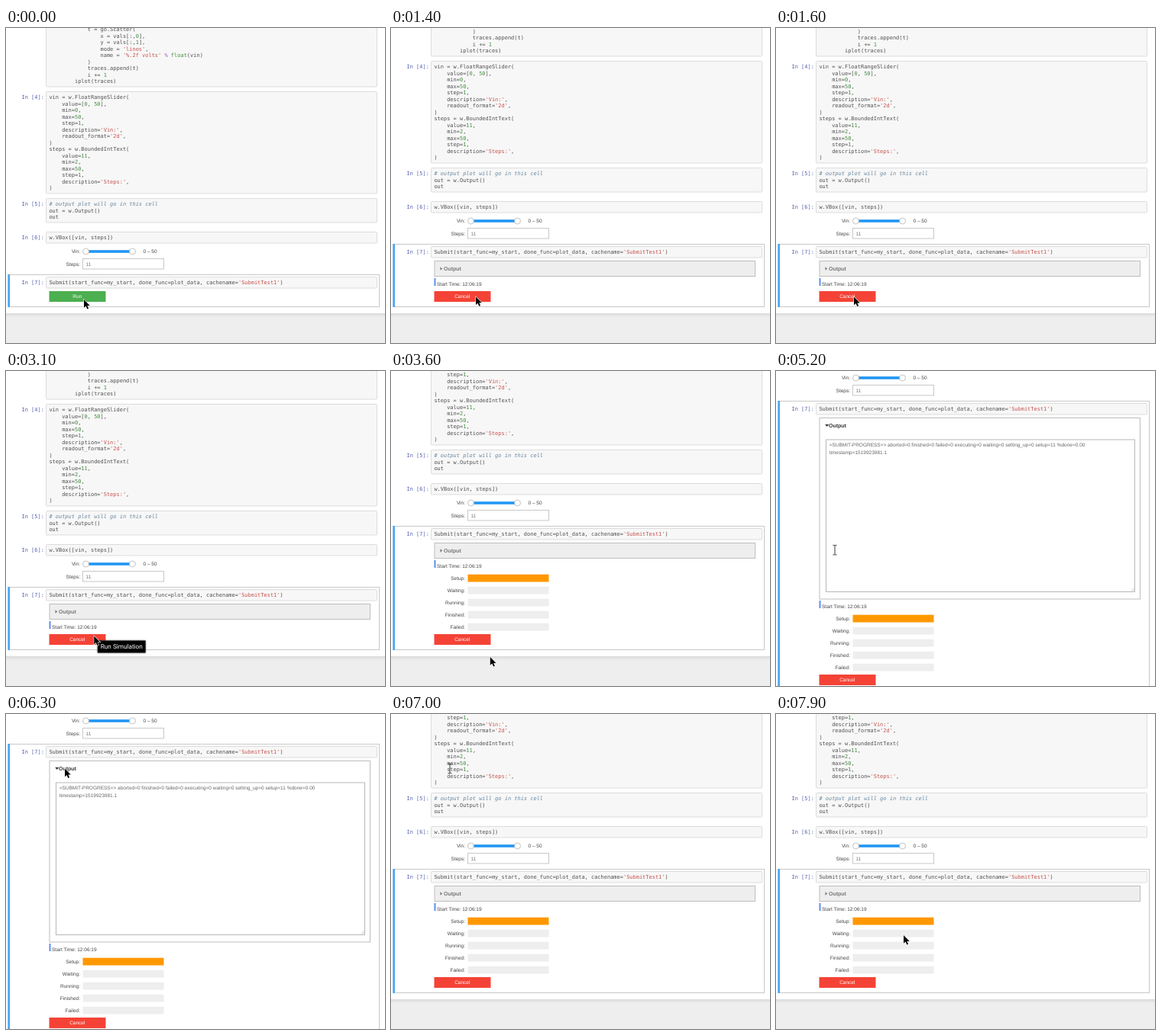
An HTML page that plays this animation: 496 by 413 pixels, repeating every 8000 ms.

```html
<!DOCTYPE html>
<html lang="en">
<head>
<meta charset="utf-8">
<title>Notebook run</title>
<style>
  html, body { margin: 0; width: 100%; height: 100%; overflow: hidden; background: #fff; }
  svg { display: block; width: 496px; height: 413px; }
  text { font: 6.5px "Liberation Sans", Arial, sans-serif; fill: #444; white-space: pre; text-rendering: geometricPrecision; }
  .code { font: 6.97px "DejaVu Sans Mono", monospace; fill: #505050; }
  .prompt { fill: #5560ac; }
  .comment { fill: #6888a0; font-style: italic; }
  .string { fill: #c4524e; }
  .number { fill: #3f8f3f; }
  .builtin { fill: #3f8f3f; }
  .operator { fill: #a050d8; }
  .button { fill: #fff; text-anchor: middle; }
  .label { text-anchor: end; }
  .value { fill: #777; }
  .summary { font-size: 7px; font-weight: bold; }
  .log { fill: #666; }
  .tip { font: 8.2px Roboto, "Noto Sans", sans-serif; fill: #fff; }
  .arrow { fill: #000; stroke: #fff; stroke-width: 1.1px; paint-order: stroke; }
  .popup { filter: drop-shadow(.6px .8px 1px rgba(0, 0, 0, .5)); }
</style>
</head>
<body>
<svg id="stage" viewBox="0 0 496 413">
  <defs>
    <linearGradient id="shade" x1="0" y1="0" x2="0" y2="1">
      <stop offset="0" stop-color="#dadada"/>
      <stop offset="1" stop-color="#eee"/>
    </linearGradient>
  </defs>
</svg>
<script>
const LOOP = 8000;
const STEP = 100;
const LINE = 8.5;
const stage = document.getElementById('stage');

function add(parent, tag, attrs = {}, content) {
  const el = document.createElementNS('http://www.w3.org/2000/svg', tag);
  set(el, attrs);
  if (content !== undefined) el.textContent = content;
  parent.appendChild(el);
  return el;
}
function set(el, attrs) {
  for (const key in attrs) el.setAttribute(key, attrs[key]);
}
const group = parent => add(parent, 'g');
const rect = (parent, x, y, width, height, fill, stroke = 'none') =>
  add(parent, 'rect', { x, y, width, height, fill, stroke });
const label = (parent, x, y, content, cls = '') =>
  add(parent, 'text', { x, y, class: cls }, content);
const move = (el, x, y) => el.setAttribute('transform', `translate(${x} ${y})`);
const show = (el, on) => { el.style.display = on ? '' : 'none'; };
const inside = (v, low, high) => v >= low && v <= high;

// Code cells: prompt number, top, text
const cells = [
  ['', -5.5,
`            t = go.Scatter(
                x = vals[:,0],
                y = vals[:,1],
                mode = 'lines',
                name = '%.2f volts' % float(vin)
            )
            traces.append(t)
            i += 1
        iplot(traces)`],
  ['4', 83.5,
`vin = w.FloatRangeSlider(
    value=[0, 50],
    min=0,
    max=50,
    step=1,
    description='Vin:',
    readout_format='2d',
)
steps = w.BoundedIntText(
    value=11,
    min=2,
    max=50,
    step=1,
    description='Steps:',
)`],
  ['5', 223.5,
`# output plot will go in this cell
out = w.Output()
out`],
  ['6', 267.5, 'w.VBox([vin, steps])'],
  ['7', 326.5, "Submit(start_func=my_start, done_func=plot_data, cachename='SubmitTest1')"]
].map(([num, top, code]) => {
  const lines = code.split('\n');
  return { num, top, lines, height: lines.length * LINE + 6 };
});
const TOKEN = /(#.*)|('[^']*')|(\b\d+\b)|(\bfloat\b)|(%)/g;
const KINDS = ['comment', 'string', 'number', 'builtin', 'operator'];

function codeLine(parent, x, y, line) {
  const text = label(parent, x, y, '', 'code');
  let end = 0;
  for (const m of line.matchAll(TOKEN)) {
    add(text, 'tspan', {}, line.slice(end, m.index));
    add(text, 'tspan', { class: KINDS[m.slice(1).findIndex(Boolean)] }, m[0]);
    end = m.index + m[0].length;
  }
  add(text, 'tspan', {}, line.slice(end));
}

// Page end and frame of the active cell
const foot = group(stage);
rect(foot, 0, 374, 496, 100, '#eee');
rect(foot, 0, 374, 496, 5, 'url(#shade)');
const frame = rect(stage, 3, 323.5, 485.5, 42, '#fff', '#c8c8c8');
const bar = rect(stage, 2.5, 323, 2.5, 43, '#42a5f5');

// Everything that scrolls with the code
const page = group(stage);
for (const { num, top, lines, height } of cells) {
  const base = top + 9.9;
  set(rect(page, 52.5, top, 433, height, '#f7f7f7', '#dcdcdc'), { rx: 1 });
  if (num) label(page, 20.5, base, `In [${num}]:`, 'code prompt');
  lines.forEach((line, i) => codeLine(page, 56.4, base + i * LINE, line));
}
label(page, 97, 295.4, 'Vin:', 'label');
rect(page, 104.5, 291.2, 61, 3.6, '#2196f3');
for (const cx of [104.5, 165.5])
  add(page, 'circle', { cx, cy: 293, r: 4, fill: '#fff', stroke: '#aaa', 'stroke-width': .7 });
label(page, 179.5, 295.4, '0 – 50');
label(page, 97, 311.5, 'Steps:', 'label');
rect(page, 100.5, 302.5, 106, 13.5, '#fff', '#c8c8c8');
label(page, 104.5, 311.7, '11', 'value');

// Collapsible output panel
const panel = group(page);
const panelBox = rect(panel, 57, 345.5, 419.5, 20, '#eee', '#bdbdbd');
const mark = add(panel, 'path');
const summary = label(panel, 69, 358, 'Output', 'summary');
const log = group(panel);
rect(log, 65.5, 374, 404, 199.5, '#fff', '#b8b8b8');
label(log, 69.7, 383.2, '=SUBMIT-PROGRESS=> aborted=0 finished=0 failed=0 executing=0 waiting=0 setting_up=0 setup=11 %done=0.00', 'log');
label(log, 69.7, 393.2, 'timestamp=1519923981.1', 'log');
add(log, 'path', { d: 'M465 572.5l4 -4M467.5 572.5l1.5 -1.5', stroke: '#999', 'stroke-width': .6 });

// Start time, progress bars, button
const start = group(stage);
rect(start, 56.5, 248, 2, 10, '#5a8ff0');
label(start, 60, 257.9, 'Start Time: 12:06:19');
const bars = group(stage);
['Setup', 'Waiting', 'Running', 'Finished', 'Failed'].forEach((name, i) => {
  const y = 271.6 + i * 16;
  label(bars, 97, y + 2.3, name + ':', 'label');
  rect(bars, 100.5, y - 4.9, 106, 9.8, i ? '#eee' : '#ff9800');
});
const button = group(stage);
const buttonBox = rect(button, 56.5, 345, 74, 14, '#4caf50');
const buttonText = label(button, 93.3, 354.3, 'Run', 'button');

// Tooltip and pointers
const tip = group(stage);
set(rect(tip, 0, 0, 62.5, 15.5, '#000', '#333'), { 'stroke-width': .6, class: 'popup' });
label(tip, 3.8, 10.6, 'Run Simulation', 'tip');
const arrow = add(stage, 'path', {
  d: 'M0 0V10.8L2.5 8.5L4.3 12.6L6.1 11.8L4.4 7.9H7.8Z', class: 'arrow'
});
const beam = add(stage, 'path', {
  d: 'M-2.5 -6.3H-.8L0 -5.6L.8 -6.3H2.5M0 -5.6V5.6M-2.5 6.3H-.8L0 5.6L.8 6.3H2.5',
  fill: 'none', stroke: '#222', 'stroke-width': .9
});

// Layouts: scroll of the code, offset of the status rows, offset of the page end
const EMPTY = { scroll: 0, status: 0, end: 0 };
const STARTED = { scroll: -40, status: 80, end: 0, panel: true };
const SETUP = { scroll: -120, status: 0, end: 0, panel: true, bars: true };
const OPEN = { scroll: -284, status: 53, end: 53, panel: true, bars: true, open: true };
const layouts = [[0, EMPTY], [1400, STARTED], [3200, SETUP], [5200, OPEN], [6900, SETUP]];
const layoutAt = t => layouts.findLast(([from]) => from <= t)[1];

const tips = [
  { from: 700, to: 1300, x: 108, y: 361.5 },
  { from: 2800, to: 3200, x: 120, y: 353.7 }
];

// Pointer moves: start time, number of steps, goal, optional bend
const moves = [
  { from: 200, steps: 1, goal: [120, 352] },
  { from: 1300, steps: 4, goal: [102, 352.5] },
  { from: 2000, steps: 4, goal: [115.3, 347.5], bend: [108, 333] },
  { from: 3200, steps: 5, goal: [129.8, 375] },
  { from: 3800, steps: 2, goal: [128, 363.5] },
  { from: 4100, steps: 7, goal: [77, 234.7] },
  { from: 5600, steps: 5, goal: [77, 71.5], bend: [108, 150] },
  { from: 7300, steps: 7, goal: [167, 290], bend: [90, 180] }
];

function pointerAt(t) {
  let pos = [102, 356];
  for (const { from, steps, goal, bend } of moves) {
    if (t < from) break;
    const u = Math.min(1, (Math.floor((t - from) / STEP) + 1) / steps);
    pos = pos.map((a, i) => {
      const mid = bend ? bend[i] : (a + goal[i]) / 2;
      return (1 - u) ** 2 * a + 2 * u * (1 - u) * mid + u * u * goal[i];
    });
  }
  return pos;
}

function draw(t) {
  const view = layoutAt(t);
  const [x, y] = pointerAt(t);
  const docY = y - view.scroll;
  const hover = view.open || inside(docY, 345.5, 365.5) && inside(x, 57, 476);
  const typing = inside(x, 52, 485) && (
    cells.some(({ top, height }) => inside(docY, top, top + height)) ||
    view.open && inside(docY, 374, 573));

  move(page, 0, view.scroll);
  move(foot, 0, view.end);
  move(button, 0, view.end);
  move(start, 0, view.status);
  move(bars, 0, view.status);
  set(frame, { y: 323.5 + view.scroll, height: 42 + view.end - view.scroll });
  set(bar, { y: 323 + view.scroll, height: 43 + view.end - view.scroll });

  show(panel, view.panel);
  show(start, view.panel);
  show(bars, view.bars);
  show(log, view.open);
  const ink = hover ? '#333' : '#777';
  set(panelBox, { height: view.open ? 237.5 : 20, fill: hover ? '#fff' : '#eee' });
  set(mark, { d: view.open ? 'M64.2 354h5l-2.5 3z' : 'M64.5 353.2v4.6l2.7 -2.3z', fill: ink });
  summary.style.fill = ink;

  set(buttonBox, { fill: view.panel ? '#f44336' : '#4caf50' });
  buttonText.textContent = view.panel ? 'Cancel' : 'Run';

  const hint = tips.find(({ from, to }) => t >= from && t < to);
  show(tip, hint);
  if (hint) move(tip, hint.x, hint.y);
  show(arrow, !typing);
  show(beam, typing);
  move(typing ? beam : arrow, x, y);
}

const began = performance.now();
function tick() {
  draw((performance.now() - began) % LOOP);
  requestAnimationFrame(tick);
}
tick();
</script>
</body>
</html>
```
